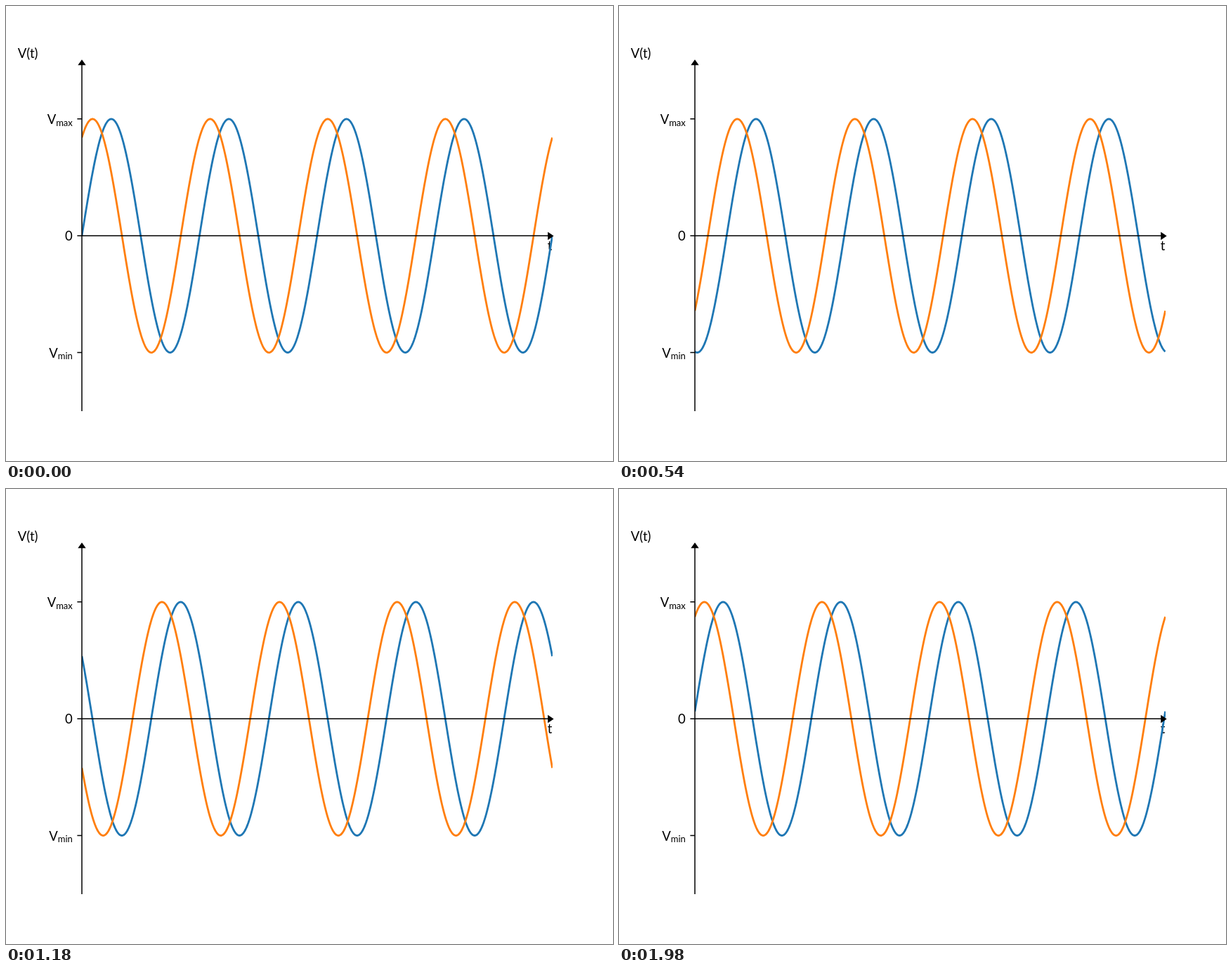
Recreate the animation shown at these times as an HTML page. Size 864x648 px, loop 2 s.

```html
<!DOCTYPE html>
<html lang="en">
<head>
<meta charset="utf-8">
<title>Phase-shifted waves</title>
<style>
html, body { margin: 0; width: 100%; height: 100%; overflow: hidden; background: #fff; }
svg { display: block; width: 864px; height: 648px; }
text { font: 18.5px Lato, "Open Sans", sans-serif; }
.sub { font-size: 13px; }
.end { text-anchor: end; }
.wave { fill: none; stroke-width: 2.81; stroke-linejoin: round; }
.axis { stroke: #000; stroke-width: 1.5; }
</style>
</head>
<body>
<svg viewBox="0 0 864 648">
  <clipPath id="plot"><rect x="108" y="78" width="670" height="499"/></clipPath>
  <text x="16.8" y="73.6">V(t)</text>
  <text x="774" y="348" text-anchor="middle">t</text>
  <text x="94.8" y="334" class="end">0</text>
  <text x="94.8" y="168" class="end">V<tspan class="sub" dy="2.6">max</tspan></text>
  <text x="94.8" y="500.6" class="end">V<tspan class="sub" dy="2.6">min</tspan></text>
  <path class="axis" d="M101.4 160.8H108M101.4 327.2H108M101.4 493.4H108"/>
  <g clip-path="url(#plot)">
    <path class="wave" id="blue" stroke="#1f77b4"/>
    <path class="wave" id="orange" stroke="#ff7f0e"/>
  </g>
  <path class="axis" d="M108 577V80M107.3 327.2H775" fill="none"/>
  <path d="M108 76.2L113.7 84.3H102.3ZM779.7 327.5L771.2 333.2V321.8Z"/>
</svg>
<script>
const LEFT = 108, WIDTH = 669.6, MID = 327.24, AMP = 166.32;
const LOOP = 2000, STEP = 20, TAU = 2 * Math.PI;
const blue = document.getElementById("blue");
const orange = document.getElementById("orange");

function wavePath(phase) {
  const points = [];
  for (let i = 0; i <= 500; i++) {
    const u = i / 500;
    const y = MID - AMP * Math.sin(4 * TAU * u + phase);
    points.push((LEFT + WIDTH * u).toFixed(2) + " " + y.toFixed(2));
  }
  return "M" + points.join("L");
}

function draw() {
  const time = Math.floor(performance.now() % LOOP / STEP) * STEP;
  const phase = -TAU * time / LOOP;
  blue.setAttribute("d", wavePath(phase));
  orange.setAttribute("d", wavePath(phase + 1));
  requestAnimationFrame(draw);
}
draw();
</script>
</body>
</html>
```
